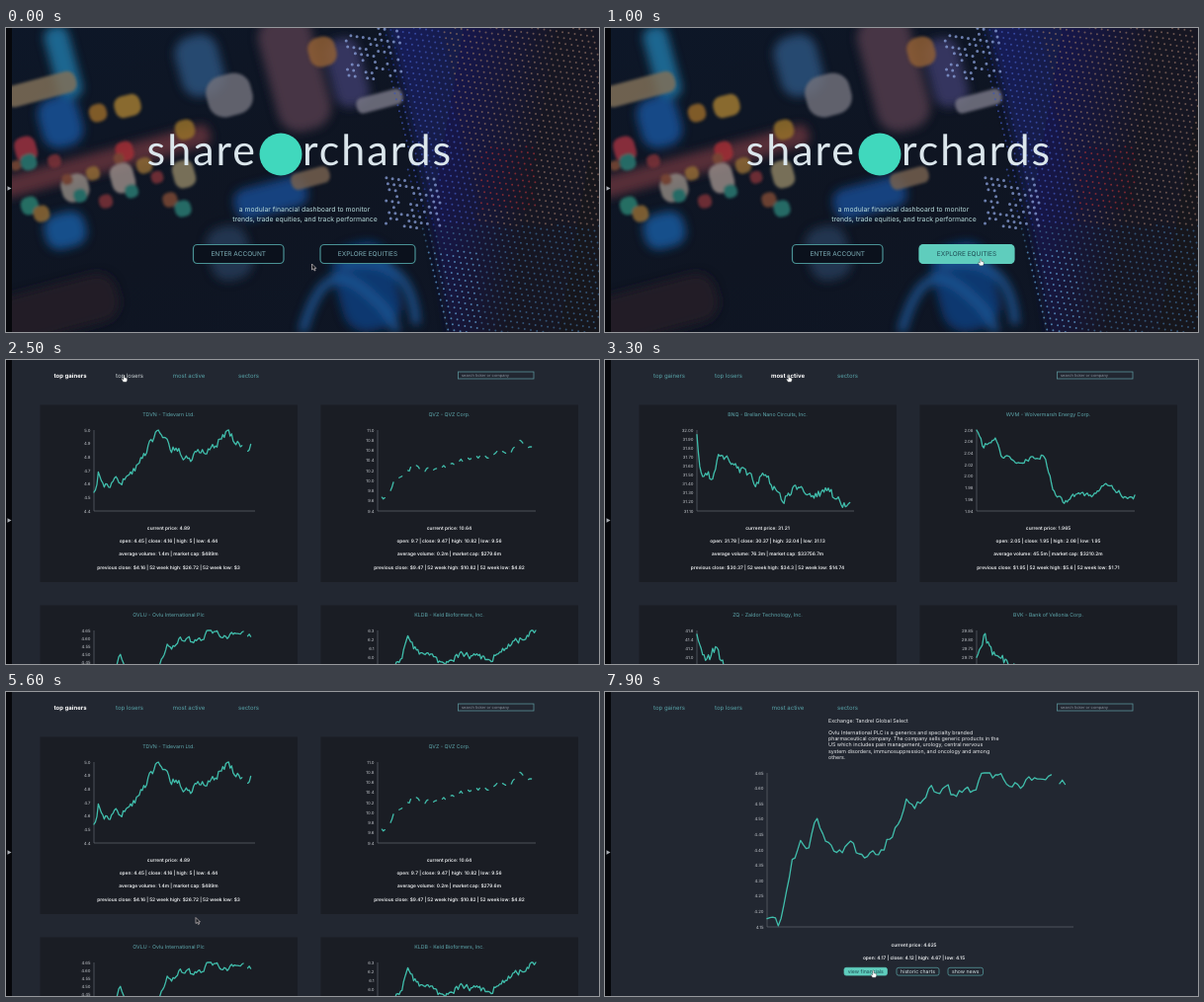
An HTML page that plays this animation: 600 px wide and 308 px high, repeating every 8 s.

```html
<!DOCTYPE html>
<html lang="en">
<head>
<meta charset="utf-8">
<title>Stock dashboard</title>
<style>
html, body { margin: 0; width: 100%; height: 100%; overflow: hidden; background: #222731; }
svg { display: block; width: 600px; height: 308px; font-family: Inter, Roboto, sans-serif; text-rendering: geometricPrecision; }
.brand { font: 400 43px Lato, sans-serif; letter-spacing: 2px; fill: #dbe6ec; }
.lead { font-size: 6.85px; fill: #b9dcdc; }
.cta { font-size: 6.5px; }
.nav { font-size: 6px; fill: #58a3a8; }
.title { font-size: 5.25px; fill: #5fa9ae; }
.stat { font-size: 4.8px; font-weight: 600; fill: #eef0f2; }
.tick { font-size: 4.3px; fill: #c3c7cc; }
.info { font-size: 5.3px; fill: #eceef0; }
.hint { font-size: 4px; fill: #8b95a0; }
.small { font-size: 5.2px; }
.line { fill: none; stroke: #40bdab; stroke-width: 1.3; stroke-linejoin: round; stroke-linecap: round; }
.axis { fill: none; stroke: #626872; stroke-width: .7; }
</style>
</head>
<body>
<svg id="stage" viewBox="0 0 600 308">
  <defs>
    <linearGradient id="night" x2="1" y2="1">
      <stop offset="0" stop-color="#0d1728"/>
      <stop offset=".5" stop-color="#0f1522"/>
      <stop offset="1" stop-color="#0e1626"/>
    </linearGradient>
    <linearGradient id="panel" x2="1" y2=".25">
      <stop offset="0" stop-color="#15215c"/>
      <stop offset=".4" stop-color="#121845"/>
      <stop offset=".75" stop-color="#161722"/>
      <stop offset="1" stop-color="#14161f"/>
    </linearGradient>
    <filter id="soft" x="-10%" y="-10%" width="120%" height="120%"><feGaussianBlur stdDeviation="5"/></filter>
    <filter id="bokeh" x="-10%" y="-10%" width="120%" height="120%"><feGaussianBlur stdDeviation="1.8"/></filter>
  </defs>
</svg>
<script>
const LOOP = 8000, STEP = 100;
const stage = document.getElementById('stage');

function el(tag, attrs, parent = stage, text) {
  const node = document.createElementNS('http://www.w3.org/2000/svg', tag);
  for (const key in attrs) node.setAttribute(key, attrs[key]);
  if (text !== undefined) node.textContent = text;
  return parent.appendChild(node);
}
const group = (parent = stage, attrs = {}) => el('g', attrs, parent);
const rect = (p, x, y, width, height, fill, more) => el('rect', { x, y, width, height, fill, ...more }, p);
const label = (p, cls, x, y, text, anchor = 'middle') =>
  el('text', { class: cls, x, y, 'text-anchor': anchor }, p, text);

function random(seed) {
  return () => {
    seed = (seed * 16807) % 2147483647;
    return seed / 2147483647;
  };
}

// ---------- home ----------
const home = group();

function blob(p, x, y, w, h, fill, tilt = -15) {
  rect(p, x - w / 2, y - h / 2, w, h, fill, { rx: Math.min(w, h) / 2.5, transform: `rotate(${tilt} ${x} ${y})` });
}

// Lamps on the display wall take their colour from where they sit.
function lampColour(x, y, rnd) {
  const near = (cx, cy, w, h) => Math.abs(x - cx) < w && Math.abs(y - cy) < h;
  if (near(372, 22, 28, 30) || near(412, 177, 28, 26)) return rnd() < .6 ? '#8ba2dc' : '#2b3f9c';
  if (near(508, 152, 28, 32)) return '#9c3035';
  if (y > 225 && x < 480) return '#5f9ccf';
  if (y > 200) return '#3c6690';
  return x < 440 + y * .2 ? '#3f55b4' : '#86695f';
}

function drawPhoto() {
  rect(home, 0, 0, 600, 308, 'url(#night)');
  const glow = group(home, { filter: 'url(#soft)' });
  [[58, 35, 25, 75, '#1f6690'], [55, 95, 42, 52, '#134987'], [196, 38, 44, 62, '#27486f'],
   [292, 45, 55, 120, '#463644'], [345, 45, 35, 70, '#34365e'], [100, 135, 220, 22, '#572f38'],
   [268, 172, 75, 32, '#14427f'], [60, 205, 42, 36, '#184f8b'], [226, 228, 42, 55, '#22364f'],
   [365, 262, 60, 90, '#10386f'], [50, 285, 130, 50, '#201a26']]
    .forEach(shape => blob(glow, ...shape));
  el('path', { d: 'M300 308Q320 235 355 260T395 308M340 240Q410 225 415 300', fill: 'none', stroke: '#1b5593', 'stroke-width': 8 }, glow);

  const wall = 'M385 -10H610V318H450Q425 150 385 -10';
  el('path', { d: wall, fill: 'url(#panel)', filter: 'url(#soft)' }, home);

  const lights = group(home, { filter: 'url(#bokeh)', opacity: .85 });
  [[35, 62, 74, 22, '#807058'], [93, 86, 18, 18, '#94672a'], [123, 79, 27, 22, '#a07a30'],
   [226, 68, 46, 42, '#70707a'], [320, 24, 28, 30, '#8f5f35'], [378, 74, 48, 16, '#777685'],
   [70, 162, 28, 28, '#8d8680'], [118, 152, 24, 30, '#968a86'], [180, 148, 22, 28, '#8b8062'],
   [181, 103, 20, 20, '#94702c'], [20, 123, 22, 26, '#9c3240'], [120, 125, 18, 20, '#a12f35'],
   [24, 180, 18, 18, '#2c7f70'], [308, 152, 40, 17, '#75614f']]
    .forEach(shape => blob(lights, ...shape));
  const rnd = random(9), hues = ['#7c4a35', '#2b7a72', '#8f6a35', '#7d3038'];
  for (let i = 0; i < 14; i++) {
    const size = 10 + rnd() * 8;
    blob(lights, 10 + i * 13, 128 + rnd() * 62, size, size, hues[i % 4]);
  }

  const paths = {};
  for (let j = -6; j < 54; j++) {
    for (let i = 0; i < 44; i++) {
      const x = 335 + i * 6.2 + j * 1.5, y = j * 6 + i * .9;
      const colour = lampColour(x, y, rnd);
      if (x < 375 + y * .22 && colour !== '#8ba2dc') continue;
      paths[colour] = (paths[colour] || '') + `M${x.toFixed(1)} ${y.toFixed(1)}h.01`;
    }
  }
  for (const stroke in paths) {
    el('path', { d: paths[stroke], stroke, 'stroke-width': stroke === '#8ba2dc' ? 3 : 2, 'stroke-linecap': 'round', opacity: .75 }, home);
  }
}

function button(p, x, y, w, h, text, cls, r) {
  const big = h > 12;
  const box = rect(p, x, y, w, h, 'none', { rx: r, 'stroke-width': big ? 1.2 : .7 });
  const words = label(p, cls, x + w / 2, y + h / 2 + (big ? 2.3 : 1.8), text);
  const idle = big ? ['#0b111c', '#4a9295', '#7fb0b8'] : ['#222731', '#5ba7a9', '#d7e6e8'];
  const paint = on => {
    const [fill, stroke, ink] = on ? ['#5fcdbd', '#5fcdbd', '#1d4a52'] : idle;
    box.setAttribute('fill', fill);
    box.setAttribute('stroke', stroke);
    words.setAttribute('fill', ink);
  };
  return { x, y, w, h, paint };
}

drawPhoto();
label(home, 'brand', 254, 139, 'share', 'end');
label(home, 'brand', 300, 139, 'rchards', 'start');
el('circle', { cx: 278, cy: 128, r: 21.5, fill: '#40d8bd' }, home);
label(home, 'lead', 302, 186.3, 'a modular financial dashboard to monitor');
label(home, 'lead', 302.5, 195.5, 'trends, trade equities, and track performance');
button(home, 189.5, 219.5, 91.5, 19, 'ENTER ACCOUNT', 'cta', 4).paint(false);
const explore = button(home, 318, 219.5, 96, 19, 'EXPLORE EQUITIES', 'cta', 4);

// ---------- charts ----------
// A price line: a few turning points as fractions of the plot, joined with seeded noise.
// Past `gap` (a fraction of the width) trades are sparse and the line breaks up.
function price(turns, { seed = 7, noise = .08, gap = 1 } = {}) {
  return (x, right, top, height) => {
    const rnd = random(seed * 7919), count = 110;
    let d = '', drift = 0, k = 0, pen = false;
    for (let i = 0; i <= count; i++) {
      const u = i / count;
      while (k < turns.length - 2 && u > turns[k + 1][0]) k++;
      const [[u0, v0], [u1, v1]] = [turns[k], turns[k + 1]];
      drift = drift * .45 + (rnd() - .5) * noise;
      const v = Math.min(1, Math.max(0, v0 + (v1 - v0) * (u - u0) / (u1 - u0) + drift));
      const down = u <= gap || i % 6 > 2;
      if (down) d += `${pen ? 'L' : 'M'}${(x + u * (right - x)).toFixed(1)} ${(top + v * height).toFixed(1)}`;
      pen = down;
    }
    return d;
  };
}

function chart(p, x, right, top, height, [max, step, count, digits], line) {
  for (let i = 0; i < count; i++) {
    label(p, 'tick', x - 3.5, top + i * height / (count - 1) + 1.6, (max - i * step).toFixed(digits), 'end');
  }
  el('path', { class: 'axis', d: `M${x} ${top}V${top + height}H${right}` }, p);
  el('path', { class: 'line', d: line(x, right, top, height) }, p);
}

const stats = (now, open, close, high, low, volume, cap, top, bottom) => [
  `current price: ${now}`,
  `open: ${open} | close: ${close} | high: ${high} | low: ${low}`,
  `average volume: ${volume}m | market cap: $${cap}m`,
  `previous close: $${close} | 52 week high: $${top} | 52 week low: $${bottom}`];

function cards(list) {
  const page = group();
  list.forEach(([name, ticks, line, facts = []], i) => {
    const left = i % 2 ? 318.5 : 34.5, top = i < 2 ? 45.5 : 248.5, mid = left + 130;
    rect(page, left, top, 260.5, 179.5, '#1a1d24');
    label(page, 'title', mid, top + 11, name);
    const x = i % 2 ? 376 : ticks[0] > 30 ? 93 : 89;
    chart(page, x, i % 2 ? 536 : 252, top + 25.5, 82, ticks, line);
    facts.forEach((text, k) => label(page, 'stat', mid, 171.6 + k * 13.3, text));
  });
  return page;
}

const climbTicks = [4.65, .05, 11, 2];
const climb = price([[0, .96], [.04, .98], [.08, .58], [.115, .45], [.14, .48], [.158, .27], [.185, .42],
  [.24, .5], [.265, .44], [.315, .57], [.375, .53], [.41, .37], [.455, .16], [.49, .2], [.525, .12],
  [.6, .13], [.67, .14], [.71, .01], [.77, .03], [.815, .1], [.89, .03], [1, .07]],
  { seed: 5, noise: .07, gap: .935 });
const slide = seed => price([[0, .05], [.15, .4], [.45, .55], [.7, .85], [1, .9]], { seed, noise: .12 });

const gainers = cards([
  ['TDVN - Tidevarn Ltd.', [5, .1, 7, 1],
    price([[0, .8], [.03, .5], [.07, .69], [.16, .62], [.22, .57], [.31, .33], [.39, .02], [.45, .04],
      [.47, .2], [.6, .36], [.74, .19], [.83, .04], [.94, .24], [1, .13]], { seed: 3, noise: .1, gap: .92 }),
    stats(4.89, 4.45, 4.16, 5, 4.44, 1.4, 489, 26.72, 3)],
  ['QVZ - QVZ Corp.', [11, .2, 9, 1],
    price([[0, .87], [.06, .82], [.11, .62], [.22, .46], [.36, .48], [.52, .38], [.74, .3], [.85, .25],
      [.89, .13], [1, .28]], { seed: 8, noise: .05, gap: 0 }),
    stats(10.64, 9.7, 9.47, 10.82, 9.56, .2, 279.6, 10.82, 4.82)],
  ['OVLU - Ovlu International Plc', climbTicks, climb],
  ['KLDB - Keld Bioformers, Inc.', [6.3, .1, 10, 1],
    price([[0, .7], [.15, .35], [.19, .1], [.25, .26], [.41, .4], [.52, .3], [.7, .36], [.85, .17], [1, .01]], { seed: 4 })]
]);

const losers = cards([
  ['HRNV - Harnvale Foods Ltd.', [6.4, .2, 7, 1], slide(11), stats(5.31, 6.2, 6.42, 6.38, 5.24, 2.1, 614, 11.3, 4.9)],
  ['TSQ - Tosquin Corp.', [15, .5, 9, 1], slide(29), stats(11.4, 14.8, 15.1, 14.9, 11.2, .8, 342.5, 19.7, 10.6)],
  ['MDWX - Maddowix Group Plc', [8.5, .1, 10, 1], slide(43)],
  ['ELVQ - Elvaquin, Inc.', [3.6, .1, 10, 1], slide(61)]
]);

const active = cards([
  ['BNQ - Brellan Nano Circuits, Inc.', [32, .1, 10, 2],
    price([[0, .07], [.025, .52], [.1, .58], [.15, .26], [.26, .45], [.37, .65], [.43, .5], [.54, .88],
      [.61, .75], [.76, .78], [.85, .76], [.93, .95], [1, .85]], { seed: 6, noise: .11, gap: .95 }),
    stats(31.21, 31.78, 30.37, 32.04, 31.13, 76.3, 33756.7, 34.3, 14.74)],
  ['WVM - Wolvermarsh Energy Corp.', [2.08, .02, 8, 2],
    price([[0, .01], [.04, .2], [.12, .08], [.16, .32], [.26, .4], [.4, .34], [.425, .28], [.5, .83],
      [.56, .9], [.6, .83], [.74, .79], [.82, .68], [.94, .82], [1, .82]], { seed: 2, noise: .06 }),
    stats(1.965, '2.05', 1.95, 2.08, 1.95, 45.5, 3210.2, 5.6, 1.71)],
  ['ZQ - Zaldor Technology, Inc.', [41.6, .2, 10, 1],
    price([[0, .02], [.06, .4], [.12, .2], [.19, .5], [1, .85]], { seed: 12, noise: .12 })],
  ['BVK - Bank of Vellonia Corp.', [29.85, .05, 10, 2],
    price([[0, .28], [.05, .07], [.1, .27], [.22, .46], [1, .75]], { seed: 15, noise: .12 })]
]);

// ---------- company page ----------
const detail = group();
label(detail, 'info', 226, 31, 'Exchange: Tandrel Global Select', 'start');
['Ovlu International PLC is a generics and specialty branded',
 'pharmaceutical company. The company sells generic products in the',
 'US which includes pain management, urology, central nervous',
 'system disorders, immunosuppression, and oncology and among',
 'others.'].forEach((text, i) => label(detail, 'info', 226, 43 + i * 6.2, text, 'start'));
chart(detail, 164, 474, 82, 156, climbTicks, climb);
label(detail, 'stat', 312.5, 257.8, 'current price: 4.625');
label(detail, 'stat', 312.5, 270.8, 'open: 4.17 | close: 4.12 | high: 4.67 | low: 4.15');
const actions = [[242, 43.5, 'view financials'], [295, 43, 'historic charts'], [347, 35.5, 'show news']]
  .map(([x, w, text]) => button(detail, x, 279.3, w, 7.8, text, 'small', 2));

// ---------- shared bar ----------
const bar = group();
const tabs = [['top gainers', 65, 17], ['top losers', 125, 15], ['most active', 185, 17], ['sectors', 245.5, 11]]
  .map(([text, x, half]) => ({ x: x - half, y: 11, w: half * 2, h: 10, node: label(bar, 'nav', x, 17.6, text) }));
rect(bar, 457.5, 12, 76.5, 7, '#222731', { stroke: '#5a9298', 'stroke-width': .8 });
label(bar, 'hint', 461, 17, 'search ticker or company', 'start');

rect(stage, 0, 0, 6, 308, '#06070b');
el('path', { d: 'M1.5 160.3L5.5 162.5 1.5 164.7Z', fill: '#a9adb3' });

const arrow = el('path', { d: 'M0 0V6L1.5 4.8 2.6 7 3.6 6.5 2.6 4.4H4.4Z', fill: '#15171c', stroke: '#e8dcdc', 'stroke-width': .6 });
const hand = el('path', {
  d: 'M-.7 0Q0-.8.7 0V2.3L3.2 3V5.2L2.4 6.8H-.9L-2.6 3.9-1.8 3.4-.7 4.2Z',
  fill: '#fff', stroke: '#22262d', 'stroke-width': .4
});

// ---------- timeline ----------
const pages = [[0, home], [1700, gainers, 0], [2600, losers, 1], [3300, active, 2], [4400, gainers, 0], [5900, detail]];
// Each move: start, end, then where the pointer comes to rest.
const rest = [309.5, 239];
const moves = [[200, 800, 380, 234], [1700, 2400, 119.5, 15.5], [2700, 3200, 186, 15.5], [3600, 4100, 263, 17.5],
  [4100, 4400, 66, 15.5], [4700, 5500, 192, 228.5], [6800, 7600, 271.5, 282.5]];

function cursorAt(t) {
  let [x, y] = rest;
  for (const [from, to, tx, ty] of moves) {
    const u = Math.min(1, Math.max(0, (t - from) / (to - from))), e = u * u * (3 - 2 * u);
    x += (tx - x) * e;
    y += (ty - y) * e;
  }
  return [x, y];
}

function draw(t) {
  const [, page, tab] = pages.filter(p => p[0] <= t).pop();
  const [x, y] = cursorAt(t);
  const over = (b, pad = 0) => x >= b.x - pad && x <= b.x + b.w + pad && y >= b.y && y <= b.y + b.h;
  const show = (node, on) => { node.style.display = on ? '' : 'none'; };

  [home, gainers, losers, active, detail].forEach(p => show(p, p === page));
  show(bar, page !== home);
  explore.paint(over(explore));
  actions.forEach(b => b.paint(over(b)));
  tabs.forEach((b, i) => {
    b.node.style.fontWeight = i === tab ? 700 : 400;
    b.node.style.fill = i === tab ? '#fff' : over(b) ? '#cfd6d9' : '';
  });
  const links = page === home ? [explore] : page === detail ? [...tabs, ...actions] : tabs;
  const pointing = links.some(b => over(b, 8));
  show(hand, pointing);
  show(arrow, !pointing);
  (pointing ? hand : arrow).setAttribute('transform', `translate(${x} ${y})`);
}

function tick() {
  draw(Math.floor(performance.now() % LOOP / STEP) * STEP);
  requestAnimationFrame(tick);
}
tick();
</script>
</body>
</html>
```
